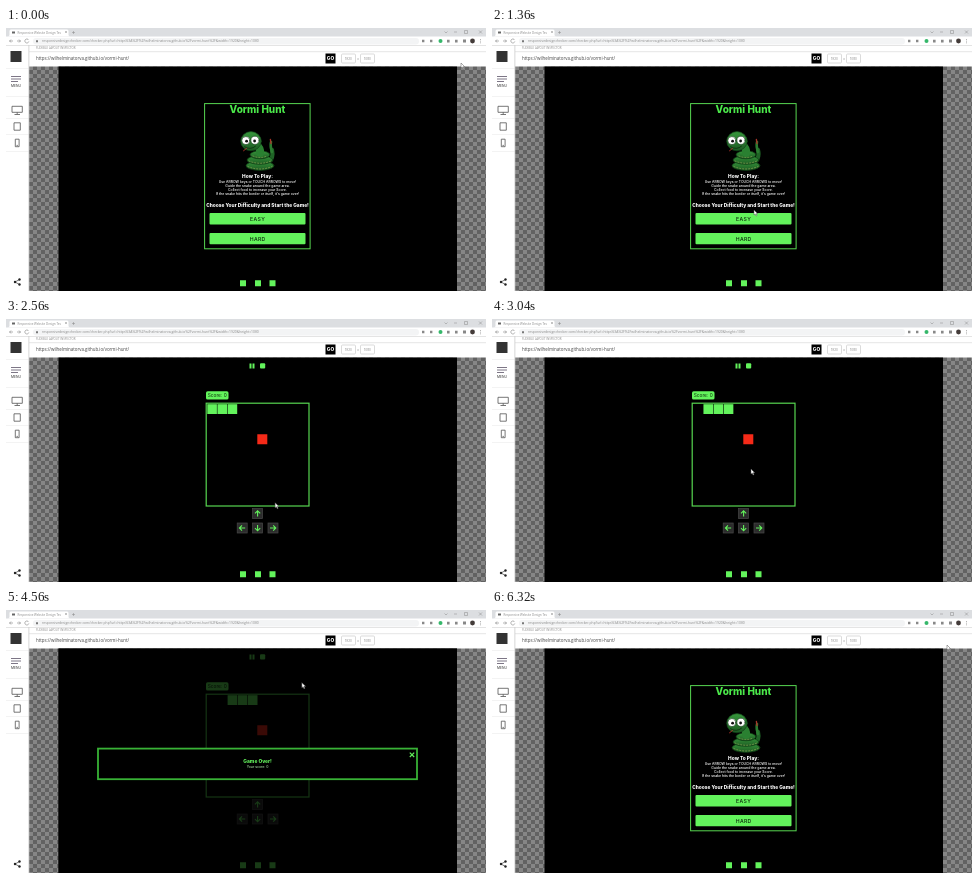
Animation, 480 px wide and 263 px high, one loop 6.48 s. Source, as an HTML page:

```html
<!DOCTYPE html>
<html lang="en">
<head>
<meta charset="utf-8">
<title>Vormi Hunt</title>
<style>
  html, body { margin: 0; width: 100%; height: 100%; overflow: hidden; background: #fff; }
  svg { display: block; width: 480px; height: 263px; }
  text { font-family: Inter, "Liberation Sans", sans-serif; }
  .mid { text-anchor: middle; }
  .bold { font-weight: 800; }
  .head { font-size: 4.85px; font-weight: 800; }
  .copy { font-size: 3.45px; font-weight: 500; }
  .btn { font-size: 5.2px; font-weight: 500; letter-spacing: .35px; fill: #0b250b; }
  .tiny { font-family: "Open Sans", "Liberation Sans", sans-serif; font-size: 3px; fill: #888; }
  .green { fill: #63f35c; }
  .frame { fill: none; stroke: #57d651; }
  .line { fill: none; stroke: #555; }
</style>
</head>
<body>
<svg viewBox="0 0 480 263">
  <defs>
    <pattern id="checker" x="27" y="38" width="8" height="8" patternUnits="userSpaceOnUse">
      <path fill="#868686" d="M0 0h8v8h-8z"/>
      <path fill="#626262" d="M0 0h4v4h-4zM4 4h4v4h-4z"/>
    </pattern>
    <g id="key">
      <rect x="-5" y="-5" width="10" height="10" fill="#2c2c2c" stroke="#484848" stroke-width=".7"/>
      <path d="M0 3V-2.6M-2.6 -.2L0 -2.8L2.6 -.2" fill="none" stroke="#63f35c" stroke-width="1.1"/>
    </g>
    <rect id="cell" width="9.6" height="9.8" class="green"/>
    <linearGradient id="skin" x2="0" y2="1">
      <stop stop-color="#37973c"/>
      <stop offset="1" stop-color="#1c5a22"/>
    </linearGradient>
  </defs>

  <!-- browser -->
  <path fill="#fff" d="M0 0h480v263H0z"/>
  <path fill="#dcdee1" d="M0 0h480v8.5H0z"/>
  <path fill="#fff" d="M2 8.5q1.5 0 1.5-2V3q0-1.5 1.5-1.5h56q1.5 0 1.5 1.5v3.5q0 2 1.5 2z"/>
  <path fill="#666" d="M6 3.5h3v2h-3z"/>
  <text x="11.5" y="5.5" class="tiny">Responsive Website Design Tes</text>
  <g fill="none" stroke="#888" stroke-width=".5">
    <path d="M59 3l2 2m0-2l-2 2M66 4.5h3m-1.5-1.5v3M438.5 3.5l1.5 1.5l1.5-1.5M448 4h3M458.5 2.5h3v3h-3zM473 2.5l3 3m0-3l-3 3"/>
    <path stroke="#666" d="M7 13H3.5l1.5-1.5M3.5 13l1.5 1.5M11 13h3.5l-1.5-1.5M14.5 13l-1.5 1.5M22.6 12a2 2 0 1 0 .2 1.5"/>
  </g>
  <rect x="27" y="10" width="386" height="6.4" rx="3.2" fill="#f3f4f5"/>
  <path fill="#777" d="M30 12.2h2v2H30z"/>
  <text x="36" y="14.2" class="tiny" style="font-size:3.38px">responsivedesignchecker.com/checker.php?url=https%3A%2F%2Fwilhelminatorva.github.io%2Fvormi-hunt%2F&amp;width=1920&amp;height=1080</text>
  <g fill="#888">
    <path d="M416 11.8h2.4v2.4H416zM424 11.8h2.4v2.4H424zM441 11.8h2.6v2.6H441zM449 11.8h2.6v2.6H449zM457 11.5h3v3h-3z"/>
    <circle cx="434.5" cy="13" r="2" fill="#35b76a"/>
    <circle cx="466.5" cy="13" r="2.4" fill="#443c3a"/>
    <path d="M474 11h.8v.8H474zM474 12.7h.8v.8H474zM474 14.4h.8v.8H474z"/>
  </g>
  <path stroke="#ddd" stroke-width=".8" d="M0 17.5h480M23 23.7h457"/>

  <!-- page header -->
  <text x="30" y="21.4" class="tiny" style="font-size:2.9px">FLEXIBLE LAYOUT INSPECTOR</text>
  <text x="30" y="31.9" class="tiny" style="font-size:4.4px;fill:#444">https://wilhelminatorva.github.io/vormi-hunt/</text>
  <path d="M319.5 25.5h10v10h-10z"/>
  <text x="324.5" y="32.2" class="mid bold" font-size="4.8" fill="#fff">GO</text>
  <g fill="none" stroke="#ccc" stroke-width=".7">
    <rect x="335.5" y="26" width="14" height="9" rx="1"/>
    <rect x="354.5" y="26" width="14" height="9" rx="1"/>
  </g>
  <g class="tiny mid">
    <text x="342.5" y="31.6">1920</text>
    <text x="352" y="31.6">x</text>
    <text x="361.5" y="31.6">1080</text>
  </g>

  <!-- sidebar -->
  <path fill="#333" d="M4.5 23h11v11h-11z"/>
  <path stroke="#eee" stroke-width=".7" d="M0 40.5h23M0 68.5h23M0 90.5h23M0 106.5h23M0 123.5h23"/>
  <path fill="none" stroke="#5c5468" stroke-width=".8" d="M5 48.5h10M5 51h10M5 53.5h7"/>
  <text x="10" y="58.5" class="mid" font-size="3.3" fill="#333">MENU</text>
  <path class="line" stroke-width=".8" d="M6 78.3h10.3v6H6zM11.2 84.3v2M8.5 86.5h5.5M8 94.8h6.3v7.4H8zM9.3 111.2h3.8v7.5h-3.8zM10.5 117.4h1.4"/>
  <path class="line" stroke-width=".8" d="M13.5 251.5L9 254l4.5 2.5"/>
  <g fill="#222"><circle cx="13.5" cy="251.5" r="1.2"/><circle cx="9" cy="254" r="1.2"/><circle cx="13.5" cy="256.5" r="1.2"/></g>

  <!-- viewport -->
  <path fill="url(#checker)" d="M23 38.5h457V263H23z"/>
  <path fill="#ccc" d="M22.5 17h.8v246h-.8z"/>
  <path d="M52.5 38.5h398.5V263H52.5z"/>
  <path class="green" d="M234 252.3h6v6h-6zM249 252.3h6v6h-6zM263.5 252.3h6v6h-6z"/>

  <g id="home">
    <rect class="frame" x="198.6" y="75.6" width="105.5" height="145.2"/>
    <text x="251.5" y="85.3" class="mid bold" font-size="10" fill="#4be84a">Vormi Hunt</text>
    <g fill="none" stroke-linecap="round">
      <path stroke="#1f6426" stroke-width="4.2" d="M262 135q6-5 4-13"/>
      <path stroke="#2b7c31" stroke-width="2.6" d="M266 124q-2-6-1-10"/>
      <path stroke="#a8352a" stroke-width="1.4" d="M265 115.5l-.6-4"/>
      <g fill="url(#skin)" stroke="#0f3a13" stroke-width=".7">
        <ellipse cx="254" cy="137.7" rx="14" ry="4.7"/>
        <ellipse cx="254" cy="132" rx="13" ry="4.3"/>
        <ellipse cx="254" cy="126.8" rx="10" ry="4"/>
      </g>
      <path stroke="#2a8031" stroke-width="8" d="M249 116q6 4 5 9"/>
      <path stroke="#74944a" stroke-width="1" stroke-dasharray="1 2" d="M242 138.5q12 5 24 0M243 133q11 4.5 22 0M247 128q7 3 14 0"/>
      <ellipse cx="245" cy="113.2" rx="10.3" ry="9.6" fill="url(#skin)" stroke="#14461a" stroke-width=".7"/>
      <g fill="#fff" stroke="#15361a" stroke-width=".6">
        <circle cx="239.8" cy="112.6" r="4"/><circle cx="249" cy="112.3" r="4.1"/>
      </g>
      <g fill="#111"><circle cx="240.6" cy="113.2" r="1.4"/><circle cx="248.6" cy="113" r="1.4"/></g>
      <path stroke="#0b2c0d" stroke-width=".8" d="M238.5 118.8q6 3.6 11-.6"/>
      <path stroke="#b8352c" stroke-width=".9" d="M240.5 120.4l-3 2.4"/>
    </g>
    <g class="mid" fill="#fff">
      <text x="251.5" y="150.2" class="head">How To Play:</text>
      <g class="copy">
        <text x="251.5" y="154.8">Use ARROW keys or TOUCH ARROWS to move!</text>
        <text x="251.5" y="159">Guide the snake around the game area.</text>
        <text x="251.5" y="163.2">Collect food to increase your Score.</text>
        <text x="251.5" y="167.4">If the snake hits the border or itself, it's game over!</text>
      </g>
      <text x="251.5" y="179.4" class="head">Choose Your Difficulty and Start the Game!</text>
    </g>
    <rect id="easy" x="203.5" y="185" width="96" height="11.5" rx="1"/>
    <rect class="green" x="203.5" y="205" width="96" height="11.2" rx="1"/>
    <text x="251.7" y="192.5" class="btn mid">EASY</text>
    <text x="251.7" y="212.5" class="btn mid">HARD</text>
  </g>

  <g id="game">
    <path class="green" d="M243.5 44.5h2v5h-2zM246.5 44.5h2v5h-2z"/>
    <rect class="green" x="254" y="44.3" width="5.2" height="5.2" rx="1"/>
    <rect class="green" x="200" y="72.3" width="22.5" height="8.2" rx="1.6"/>
    <text x="211.2" y="78.1" class="mid" font-size="4.8" fill="#0b250b">Score: 0</text>
    <rect class="frame" x="200.2" y="84.2" width="102.8" height="102.8" stroke-width="1.2"/>
    <g id="worm"><use href="#cell"/><use href="#cell" x="10.15"/><use href="#cell" x="20.3"/></g>
    <path fill="#f52a18" d="M251.3 115.2h10v10h-10z"/>
    <use href="#key" transform="translate(251.6 194.6)"/>
    <use href="#key" transform="translate(236.2 209) rotate(-90)"/>
    <use href="#key" transform="translate(251.6 209) rotate(180)"/>
    <use href="#key" transform="translate(267 209) rotate(90)"/>
  </g>

  <g id="over">
    <path opacity=".76" d="M52.5 38.5h398.5V263H52.5z"/>
    <rect x="92" y="138.6" width="319" height="30.6" stroke="#38b236" stroke-width="1.8"/>
    <text x="251.6" y="153.4" class="mid bold" font-size="4.9" fill="#63f35c">Game Over!</text>
    <text x="251.6" y="158.1" class="mid copy" fill="#a5dca0">Your score: 0</text>
    <path id="close" d="M403.8 142.6l4.4 4.4m0-4.4l-4.4 4.4" stroke-width="1.2"/>
  </g>

  <g id="cursor" fill="#fff" stroke="#555" stroke-width=".5" stroke-linejoin="round">
    <path id="arrow" d="M0 0V5l1.2-1 .9 2 .9-.4-.9-1.9h1.6z"/>
    <path id="hand" d="M-.6 0h1.1v2.4l2.7.6v2l-.7 1.8H-.4L-2 4.2l.5-.5.9.7z"/>
  </g>
</svg>
<script>
  const $ = id => document.getElementById(id);
  const LOOP = 6480, STEP = 80;

  // cursor tip: time, x, y
  const path = [
    [0, 455, 35], [80, 455, 35], [1200, 263, 176], [1360, 262, 182],
    [1680, 271, 190], [2400, 271, 190], [3040, 259, 150],
    [3120, 259, 150], [3760, 262, 62], [3920, 261.5, 55], [4080, 257, 47],
    [4400, 257, 47], [4880, 407, 146], [5280, 407, 146], [5440, 406, 147],
    [5840, 406, 147], [6320, 455, 35], [LOOP, 455, 35]
  ];

  function along(t) {
    const i = path.findIndex(p => p[0] > t);
    const [t0, x0, y0] = path[i - 1], [t1, x1, y1] = path[i];
    const k = (t - t0) / (t1 - t0), e = k * k * (3 - 2 * k);
    return [x0 + (x1 - x0) * e, y0 + (y1 - y0) * e];
  }

  const show = (id, on) => $(id).style.display = on ? "" : "none";

  function draw(now) {
    const t = Math.floor(now % LOOP / STEP) * STEP;
    const within = (a, b) => t >= a && t < b;
    const playing = within(2480, 5680);
    const onEasy = within(1440, 2480);

    show("home", !playing);
    show("game", playing);
    show("over", within(4240, 5680));
    show("hand", onEasy);
    show("arrow", !onEasy);

    $("easy").setAttribute("fill", onEasy ? "#fff" : "#63f35c");
    $("close").setAttribute("stroke", t >= 5360 ? "#d5f5d0" : "#63f35c");

    const moves = (t >= 2880) + (t >= 3440);
    $("worm").setAttribute("transform", `translate(${201.3 + moves * 10.15} 85.2)`);
    $("cursor").setAttribute("transform", `translate(${along(t)})`);
    requestAnimationFrame(() => draw(performance.now() - start));
  }

  const start = performance.now();
  draw(0);
</script>
</body>
</html>
```
